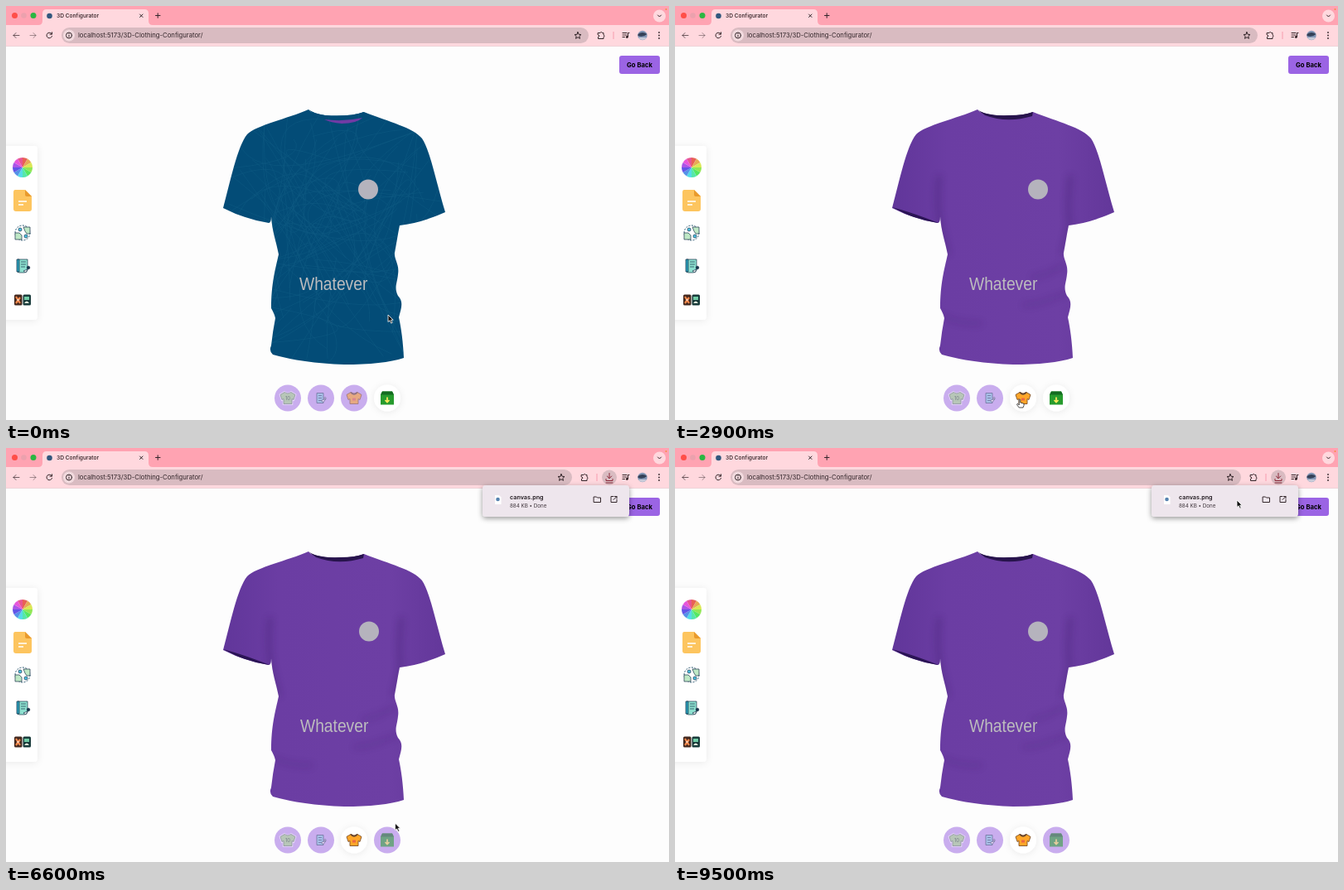
Animation of 800 by 500 pixels, one loop 9.6 s. Source, as an HTML page:

```html
<!DOCTYPE html>
<html lang="en">
<head>
<meta charset="utf-8">
<style>
  html, body { margin: 0; width: 100%; height: 100%; overflow: hidden; background: #fdfdfd; }
  svg { display: block; width: 800px; height: 500px; font-family: Inter, sans-serif; }
  .line { fill: none; stroke: #33262a; stroke-width: 1; stroke-linecap: round; stroke-linejoin: round; }
  .ink { stroke: #17334a; stroke-width: .7; stroke-linejoin: round; }
  .btn circle { fill: #fff; filter: url(#soft); }
  .btn.off > circle { fill: #c9adee; filter: none; }
  .btn.off g { opacity: .55; }
  .halo { fill: #f9f9fa; }
</style>
</head>
<body>
<svg viewBox="0 0 800 500">
  <defs>
    <filter id="soft" x="-60%" y="-60%" width="220%" height="220%"><feDropShadow dx="0" dy="1" stdDeviation="4" flood-opacity=".08"/></filter>
    <filter id="drop" x="-20%" y="-40%" width="140%" height="200%"><feDropShadow dx="0" dy="2" stdDeviation="3" flood-opacity=".4"/></filter>
    <filter id="blur" x="-100%" y="-50%" width="300%" height="200%"><feGaussianBlur stdDeviation="4"/></filter>
    <linearGradient id="cloth"><stop offset="0" stop-color="#61369a"/><stop offset=".25" stop-color="#6b3da3"/><stop offset=".75" stop-color="#6d3fa4"/><stop offset="1" stop-color="#63379a"/></linearGradient>
    <path id="body" d="M365 125 Q369 130 376 131 Q402 141 432 128 C462 140 492 147 502 160 C512 175 519 213 530 249 Q501 262 475 265 C472 280 471 288 469 298 C468 306 475 312 473 324 C472 335 468 340 473 350 C480 357 477 365 474 376 C477 390 479 405 480 425 Q455 433 408 433 Q357 431 322 421 Q317 417 320 410 Q322 392 325 377 Q324 372 320 365 C320 335 325 318 329 300 C326 284 321 272 320 254 Q320 262 317 262 Q287 257 262 244 C271 211 279 170 291 155 C302 144 340 136 365 125Z"/>
    <clipPath id="inside"><use href="#body"/></clipPath>
    <path id="tee" d="M-4-7 Q0-4 4-7 L9-4 7 2 5 1 V7 H-5 V1 L-7 2 -9-4Z"/>
  </defs>

  <g id="shirt">
    <path id="back" d="M365 125 Q371 130 385 132 Q415 134 432 128 L429 136 Q400 143 374 133Z"/>
    <g id="plain">
      <use href="#body" fill="url(#cloth)"/>
      <g clip-path="url(#inside)">
        <g filter="url(#blur)" fill="none" stroke="#3c1d6a" opacity=".4">
          <path stroke-width="5" d="M319 205 Q315 235 320 265 L329 300M477 205 Q473 240 476 266L468 300"/>
          <path stroke-width="4" opacity=".6" d="M475 345 Q440 362 420 361M322 374 Q345 385 370 383M470 312 Q450 325 430 328"/>
        </g>
        <path d="M262 243 Q288 250 318 262 L300 262Z" fill="#2b1455"/>
      </g>
      <path d="M369 128 Q382 133 404 132 Q422 132 432 128 L431 133 Q401 142 374 132Z" fill="#28144d"/>
    </g>
    <g id="printed">
      <use href="#body" fill="#034c77"/>
      <path d="M365 125 Q371 130 385 132 Q415 134 432 128 L429 139 H380Z" fill="#034c77"/>
      <g id="threads" clip-path="url(#inside)" fill="none" stroke="#2b7d9f" stroke-width=".7" opacity=".24"/>
      <path d="M384 137 Q408 140 430 135 Q423 142 405 142 Q392 141 384 137Z" fill="#713ba5"/>
    </g>
    <g id="decals">
      <circle cx="438" cy="221.500" r="12" fill="#b5b3bd"/>
      <text transform="translate(355 343) scale(.875 1)" font-family="Liberation Sans, Arial, sans-serif" font-size="22" fill="#bcbcbe">Whatever</text>
    </g>
  </g>

  <rect x="-10" y="169" width="48" height="210" rx="4" fill="#fff" filter="url(#soft)"/>
  <g id="wheel" transform="translate(20 195)"/>
  <path d="M11 222 H23 L31 230 V245 Q31 248 28 248 H12 Q9 248 9 245 V225 Q9 222 11 222Z" fill="#fdc55f"/>
  <path d="M23 222 L31 230 H25 Q23 230 23 228Z" fill="#e99a2c"/>
  <path d="M15 236H25M15 240H21" stroke="#fff" stroke-width="1.500"/>
  <g transform="translate(20 274)">
    <circle r="9" fill="none" stroke="#21506b" stroke-dasharray="2 1.500"/>
    <g class="ink"><path d="M1-7H9V1H5L3-2Z" fill="#bfe8c6"/><path d="M-9 0H-4L-1 3V8H-9Z" fill="#bfe8c6"/><circle cx="-3" cy="-4" r="2" fill="#4cc4e6"/><circle cx="4" cy="4" r="2" fill="#4cc4e6"/></g>
  </g>
  <g transform="translate(20 314)" class="ink">
    <path d="M-6-8H6V5Q5 8 2 8H-4Q-7 8-6 5Z" fill="#8ce0cf"/><path d="M-7-8H-4V7H-7Z" fill="#2b9eb8"/><path d="M-2-5H4M-2-2H4M-2 1H3" fill="none"/>
    <circle cx="7" cy="2" r="1.800" fill="#17334a"/><path d="M1 6L6 4 4 8Z" fill="#fff"/>
  </g>
  <g transform="translate(20 355)">
    <rect x="-10" y="-6.500" width="9.500" height="13" rx="1.500" fill="#44291f"/><rect x=".5" y="-6.500" width="9.500" height="13" rx="1.500" fill="#193b3b"/>
    <path d="M-8-4L-3 4M-8 4L-3-3" stroke="#f78a4d" stroke-width="2.200"/><path d="M-7 0H-4" stroke="#fff"/>
    <path d="M2-4H8V0H2Z" fill="#70cba5"/><path d="M2 4Q5-1 8 4Z" fill="#e8f2df"/>
  </g>

  <g class="btn off" transform="translate(340 473.500)"><circle class="halo" r="16"/><g><use href="#tee" fill="#a9dc8b" stroke="#fff" stroke-width="2.500"/><use href="#tee" fill="#a9dc8b" stroke="#507054" stroke-width=".7"/><text y="2" font-size="6" text-anchor="middle" fill="#38573c">10</text></g></g>
  <g class="btn off" transform="translate(380 473.500)"><circle r="16"/><g class="ink"><path d="M-5-6H3V6H-5Z" fill="#8ccfe2"/><path d="M-3-3H1M-3 0H1M-3 3H0" fill="none"/><path d="M0 3L6 1 3 5Z" fill="#fff"/><circle cx="5" cy="0" r="1" fill="#17334a"/></g></g>
  <g class="btn" id="teeButton" transform="translate(420 473.500)"><circle r="16"/><g><use href="#tee" fill="#ffa629" stroke="#805126" stroke-width=".9"/><path d="M-4-7Q0-2 4-7" fill="none" stroke="#5c4030" stroke-width="1.500"/><path d="M-2 0H2V3H-2Z" fill="#ec6843"/></g></g>
  <g class="btn" id="saveButton" transform="translate(460 473.500)"><circle r="16"/><g><path d="M-8-4L-6-8H6L8-4V8H-8Z" fill="#279b2e"/><path d="M-8-4L-6-8H6L8-4Z" fill="#146b21"/><path d="M0-1V5M-2.500 2.500L0 5 2.500 2.500" fill="none" stroke="#ffe95e" stroke-width="1.700"/></g></g>

  <rect x="740" y="60" width="49" height="22" rx="3" fill="#9b64e4"/>
  <text x="764.500" y="73.700" font-size="7.700" font-weight="700" text-anchor="middle">Go Back</text>

  <path d="M0 0H800V24H0Z" fill="#ffa3b2"/>
  <path d="M0 23H800V48.500H0Z" fill="#ffd8de"/>
  <path d="M0 48.500H800" stroke="#e8cbd0" stroke-width=".7"/>
  <path d="M39 23Q44 23 44 18V9Q44 4 49 4H167Q172 4 172 9V18Q172 23 177 23Z" fill="#ffd8de"/>
  <circle cx="10.500" cy="11.500" r="3.500" fill="#ff4e48"/><circle cx="21.500" cy="11.500" r="3.300" fill="#eba1ad"/><circle cx="33" cy="11.500" r="3.500" fill="#2bb641"/>
  <circle cx="52.500" cy="12" r="3.300" fill="#31577d"/>
  <text x="61" y="14.300" font-size="6.650" font-weight="500" fill="#2b1d20">3D Configurator</text>
  <path class="line" d="M161.500 10L165 13.500M165 10L161.500 13.500M180.500 11.500H186M183.200 8.800V14.300"/>
  <circle cx="788.500" cy="12" r="7.500" fill="#ffd8de"/><path class="line" d="M786.500 11L788.500 13 790.500 11"/>
  <circle cx="796.500" cy="4" r="1" fill="#f68b45"/>
  <rect x="67" y="26" width="636" height="19" rx="9.500" id="address" fill="#d9bbc1"/>
  <circle cx="76" cy="35.500" r="7" fill="#f2dade"/>
  <circle class="line" cx="76" cy="35.500" r="3.500" stroke-width=".8"/><path class="line" d="M76 35.200V37.200M76 33.400V33.500"/>
  <text x="87" y="38.200" font-size="7.700" fill="#33262a">localhost:5173/3D-Clothing-Configurator/</text>
  <path class="line" opacity=".7" d="M16 35.500H9M12 32.500L9 35.500 12 38.500"/>
  <path class="line" opacity=".45" d="M29 35.500H36M33 32.500L36 35.500 33 38.500"/>
  <path class="line" d="M55 33.500A3.300 3.300 0 1 0 55.500 36.500M55.500 31.800V34.200H53"/>
  <g id="tools">
    <path class="line" stroke-width=".9" d="M690 31.500L691.200 34.300 694 34.500 691.800 36.500 692.500 39.300 690 37.800 687.500 39.300 688.200 36.500 686 34.500 688.800 34.300Z"/>
    <path class="line" stroke-width="1.100" d="M714.500 32.500H717A1.300 1.300 0 0 1 719.500 32.500H721V35A1.300 1.300 0 0 1 721 37.500V39.500H714.500V37.300A1.200 1.200 0 0 0 714.500 34.800Z"/>
    <path d="M733 31V40" stroke="#f58fa3" stroke-width=".8"/>
  </g>
  <path class="line" d="M744 32.500H749M744 35H749M744 37.500H746.500M750.500 37.500V32.500H752"/><circle cx="749.300" cy="37.500" r="1.400" fill="#33262a"/>
  <circle cx="768" cy="35.500" r="5.700" fill="#8295b5"/><path d="M762.600 34Q768 30 773.500 34 Q769 38 762.600 36Z" fill="#344058"/><path d="M763 38H773A5.700 5.700 0 0 1 763 38Z" fill="#c8cbd9"/>
  <g fill="#33262a"><circle cx="788" cy="32" r=".9"/><circle cx="788" cy="35.500" r=".9"/><circle cx="788" cy="39" r=".9"/></g>

  <g id="download">
    <circle cx="728" cy="35.500" r="9" fill="#d9bbc1"/>
    <path class="line" style="stroke:#8a2637" d="M728 30.500V36.500M725.300 34L728 36.700 730.700 34M724 37.500V39.500H732V37.500M724 42H732"/>
    <rect x="575" y="45" width="177" height="38" rx="4" fill="#eee6ed" filter="url(#drop)"/>
    <path d="M590 57H595L597.500 59.500V68H590Z" fill="#fff"/><circle cx="593.500" cy="62" r="2.300" fill="#5683b0"/>
    <text x="608" y="62.300" font-size="7.200" font-weight="600" fill="#221a20">canvas.png</text>
    <text x="608" y="72" font-size="6.250" fill="#40363d">884 KB • Done</text>
    <path class="line" d="M709.500 59H712.500L713.500 60H717.500V65.500H709.500ZM733 58.500H730V65.500H737V62.500M734.500 58.500H737V61M737 58.500L733 62.500"/>
  </g>

  <g id="cursor" stroke="#fff" stroke-width=".8" stroke-linejoin="round">
    <path id="arrow" d="M0 0V8.500L2 6.800 3.700 10.200 5.200 9.400 3.600 6.200H6.200Z" fill="#111"/>
    <path id="hand" d="M-.8-.5Q0-2 .8-.5V3L4.500 4Q5.500 5 5 6.500L4 9H-.8L-3.500 5.500Q-3.500 4-2 4.700L-.8 6Z" fill="#fff" stroke="#222"/>
  </g>
</svg>
<script>
const LOOP = 9600, PRINT_OFF = 2600, SAVE = 6100, POPUP = 6500;
const $ = id => document.getElementById(id);
const show = (id, on) => $(id).style.display = on ? '' : 'none';

let seed = 17;
const rand = (min, max) => {
  seed = (seed * 16807) % 2147483647;
  return min + (max - min) * seed / 2147483647;
};
const point = () => `${rand(255, 535).toFixed(1)} ${rand(115, 440).toFixed(1)}`;
$('threads').innerHTML = Array.from({ length: 85 }, () =>
  `<path d="M${point()}Q${point()} ${point()}"/>`).join('');

const rim = i => `${12 * Math.sin(i * Math.PI / 6)} ${-12 * Math.cos(i * Math.PI / 6)}`;
$('wheel').innerHTML = Array.from({ length: 12 }, (_, i) =>
  `<path d="M0 0L${rim(i)}A12 12 0 0 1 ${rim(i + 1)}Z" fill="hsl(${i * 30 + 5} 75% 62%)"/>`).join('');

// Pointer stops: time, x, y
const stops = [
  [0, 461, 373], [900, 461, 373], [2000, 417, 458], [2300, 416, 476], [3100, 416, 476],
  [3900, 268.500, 382], [4500, 268.500, 382], [5400, 460, 471], [6500, 460, 471],
  [7300, 678, 63], [LOOP, 678, 63]
];
const smooth = u => u * u * (3 - 2 * u);
const clamp = u => Math.max(0, Math.min(1, u));

function pointer(t) {
  const i = stops.findIndex(s => s[0] > t);
  const [t0, x0, y0] = stops[i - 1], [t1, x1, y1] = stops[i];
  const u = smooth((t - t0) / (t1 - t0));
  return [x0 + (x1 - x0) * u, y0 + (y1 - y0) * u];
}

function draw(now) {
  const t = now % LOOP;
  const printed = t < PRINT_OFF, popup = t >= POPUP;
  show('printed', printed);
  show('plain', !printed);
  $('back').setAttribute('fill', printed ? '#034c77' : '#28144d');
  $('teeButton').classList.toggle('off', printed);
  $('saveButton').classList.toggle('off', t >= SAVE);
  $('decals').setAttribute('transform', `translate(${smooth(clamp((t - 900) / 1000)) - 1} 0)`);

  show('download', popup);
  $('address').setAttribute('width', popup ? 616 : 636);
  $('tools').setAttribute('transform', `translate(${popup ? -20 : 0} 0)`);

  const [x, y] = pointer(t);
  const hover = [340, 380, 420, 460].some(cx => Math.hypot(x - cx, y - 473.5) < 15);
  show('arrow', !hover);
  show('hand', hover);
  $('cursor').setAttribute('transform', `translate(${x} ${y})`);
  requestAnimationFrame(draw);
}
requestAnimationFrame(draw);
</script>
</body>
</html>
```
